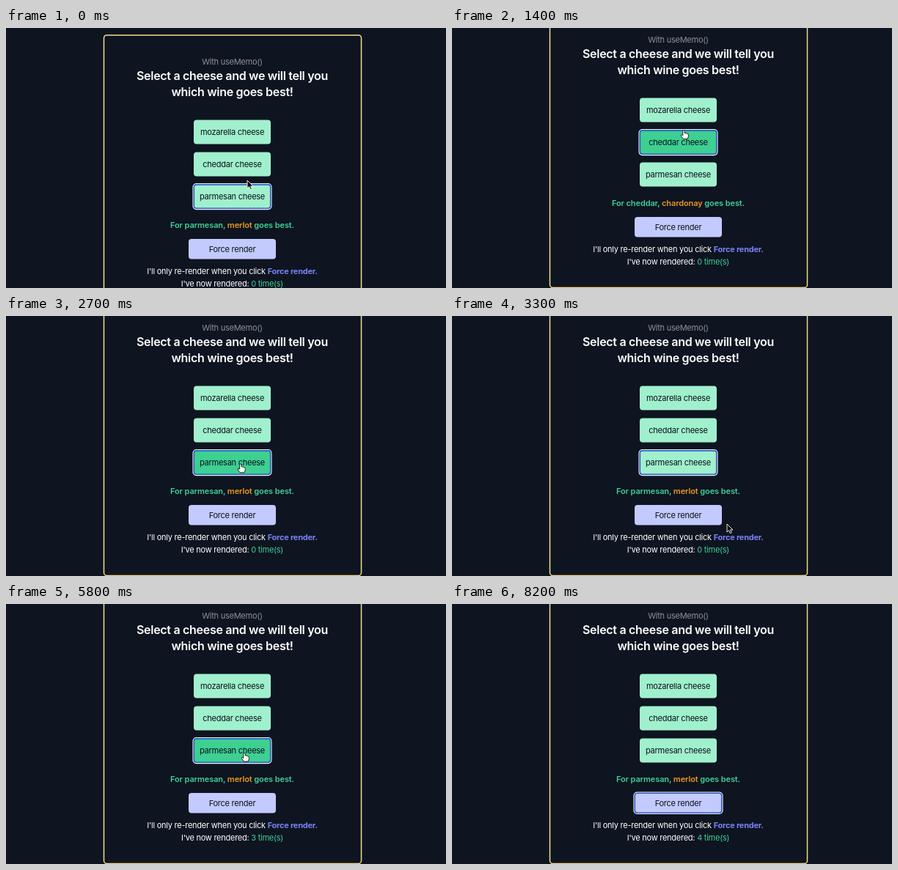
Write an HTML page that moves like this. It is 600x355 px and loops after 8500 ms.

```html
<!DOCTYPE html>
<html lang="en">
<head>
<meta charset="utf-8">
<title>Cheese and wine</title>
<style>
  html, body { margin: 0; width: 100%; height: 100%; overflow: hidden; background: #0e1420; }
  svg { display: block; width: 600px; height: 355px; }
  text { font: 11px Inter, "Open Sans", sans-serif; letter-spacing: -.25px; text-anchor: middle; fill: #fff; }
  .title { font-size: 16px; font-weight: 600; letter-spacing: -.3px; }
  .label { fill: #0b1119; }
  .result { font-weight: 600; letter-spacing: -.1px; }
  .green { fill: #3ed298; }
  .orange { fill: #ee981a; }
  .strong { fill: #7880f2; font-weight: 700; }
</style>
</head>
<body>
<svg viewBox="0 0 600 355">
  <g id="page">
    <rect x="133.5" y="-20.3" width="351" height="374.8" rx="4" fill="none" stroke="#f3dc88" stroke-width="1.5"/>
    <text x="308.5" y="20" style="fill:#8d929c">With useMemo()</text>
    <text x="308.5" y="41" class="title">Select a cheese and we will tell you</text>
    <text x="308.5" y="63" class="title">which wine goes best!</text>
    <g id="buttons"></g>
    <text x="308.5" y="243" class="result green">For <tspan id="cheese"></tspan>, <tspan id="wine" class="orange"></tspan> goes best.</text>
    <text x="308.5" y="306">I'll only re-render when you click <tspan class="strong">Force render.</tspan></text>
    <text x="308.5" y="323">I've now rendered: <tspan id="count" class="green"></tspan></text>
  </g>
  <g id="cursor" stroke-linejoin="round">
    <path id="arrow" d="M0 0V11L2.6 8.7L4.4 12.6L6.3 11.8L4.6 8H8Z" fill="#080808" stroke="#fff" stroke-width=".9"/>
    <path id="hand" d="M-1.2 .8Q0-.8 1.2 .8V4Q2.4 3.3 3.1 4.4Q4.3 3.9 4.8 5Q6.4 4.7 6.4 6.4V8.4L5.2 12H-.7L-3.4 8.2Q-4.3 6.3-2.7 6.2L-1.2 7.4Z" fill="#fff" stroke="#111" stroke-width=".9"/>
  </g>
</svg>
<script>
const LOOP = 8500, FADE = 180;
const $ = id => document.getElementById(id);
const wines = { mozarella: 'cabernet sauvignon', cheddar: 'chardonay', parmesan: 'merlot' };
const mint = [[160, 240, 205], [62, 207, 146]];
const indigo = [[195, 202, 254], [154, 165, 251]];
const buttons = [
  ...Object.keys(wines).map((name, i) => ({ name, label: name + ' cheese', x: 256, y: 95.6 + 44 * i, w: 105, h: 33, colors: mint })),
  { name: 'force', label: 'Force render', x: 249, y: 258, w: 119, h: 27.5, colors: indigo }
];

// Pointer path: time, x, y on the stage
const path = [
  [0, 329, 208], [300, 329, 208], [700, 326, 200], [1000, 319, 160], [1250, 317, 150],
  [1400, 316, 139.5], [1650, 312, 115], [1850, 310, 116], [2000, 308, 151], [2100, 308, 154],
  [2450, 318, 200], [2750, 320, 202], [3200, 373, 281], [3300, 375, 284], [3700, 374, 284],
  [4000, 342, 276], [4400, 338, 279], [5200, 337, 278], [5550, 325, 203], [5900, 325, 203],
  [6150, 322, 272], [6600, 323, 273], [7500, 561, 301]
];
const clicks = [
  [0, 'parmesan'], [1200, 'cheddar'], [1800, 'mozarella'], [2600, 'parmesan'],
  [4100, 'force'], [4700, 'force'], [5000, 'force'], [5700, 'parmesan'], [6300, 'force']
];

const mix = (a, b, k) => a + (b - a) * k;
const smooth = k => k * k * (3 - 2 * k);
const clamp = k => Math.max(0, Math.min(1, k));
const scrollAt = t => 30 * smooth(clamp((t - 200) / 500));

function pointerAt(t) {
  const i = path.findIndex(p => p[0] > t);
  if (i < 0) return path[path.length - 1].slice(1);
  const [a, b] = [path[i - 1], path[i]];
  const k = smooth((t - a[0]) / (b[0] - a[0]));
  return [mix(a[1], b[1], k), mix(a[2], b[2], k)];
}

function isOver(b, t) {
  const [x, y] = pointerAt(t);
  const dy = y - b.y - 30 + scrollAt(t);
  return x >= b.x && x <= b.x + b.w && dy >= -1 && dy <= b.h;
}

// Share of the recent past spent hovering gives a linear fade
function hoverAt(b, t) {
  let sum = 0;
  for (let i = 0; i < 12; i++) sum += isOver(b, Math.max(0, t - FADE * i / 12));
  return sum / 12;
}

function ring(b, grow, color) {
  return `<rect x="${b.x - grow}" y="${b.y - grow}" width="${b.w + 2 * grow}" height="${b.h + 2 * grow}"
    rx="${3.5 + grow}" fill="none" stroke="${color}" stroke-width="1.3"/>`;
}

$('buttons').innerHTML = buttons.map(b => `<g>
  <rect x="${b.x}" y="${b.y}" width="${b.w}" height="${b.h}" rx="4"/>
  <g>${ring(b, 0.9, '#eef3ff')}${ring(b, -0.4, '#2457c8')}</g>
  <text class="label" x="308.5" y="${b.y + b.h / 2 + 4}">${b.label}</text></g>`).join('');
buttons.forEach((b, i) => [b.face, b.ring] = $('buttons').children[i].children);

function draw(t) {
  const past = clicks.filter(c => c[0] <= t).map(c => c[1]);
  const focus = past[past.length - 1];
  const cheese = past.filter(n => n !== 'force').pop();
  $('page').setAttribute('transform', `translate(0 ${30 - scrollAt(t)})`);
  $('cheese').textContent = cheese;
  $('wine').textContent = wines[cheese];
  $('count').textContent = past.filter(n => n === 'force').length + ' time(s)';
  for (const b of buttons) {
    const k = hoverAt(b, t);
    b.face.setAttribute('fill', `rgb(${b.colors[0].map((c, i) => Math.round(mix(c, b.colors[1][i], k)))})`);
    b.ring.style.display = b.name === focus ? '' : 'none';
  }
  const over = buttons.some(b => isOver(b, t));
  $('cursor').setAttribute('transform', `translate(${pointerAt(t)})`);
  $('cursor').style.display = t < 7600 ? '' : 'none';
  $('hand').style.display = over ? '' : 'none';
  $('arrow').style.display = over ? 'none' : '';
}

const start = performance.now();
function frame() {
  const t = (performance.now() - start) % LOOP;
  draw(Math.floor(t / 100) * 100);
  requestAnimationFrame(frame);
}
frame();
</script>
</body>
</html>
```
